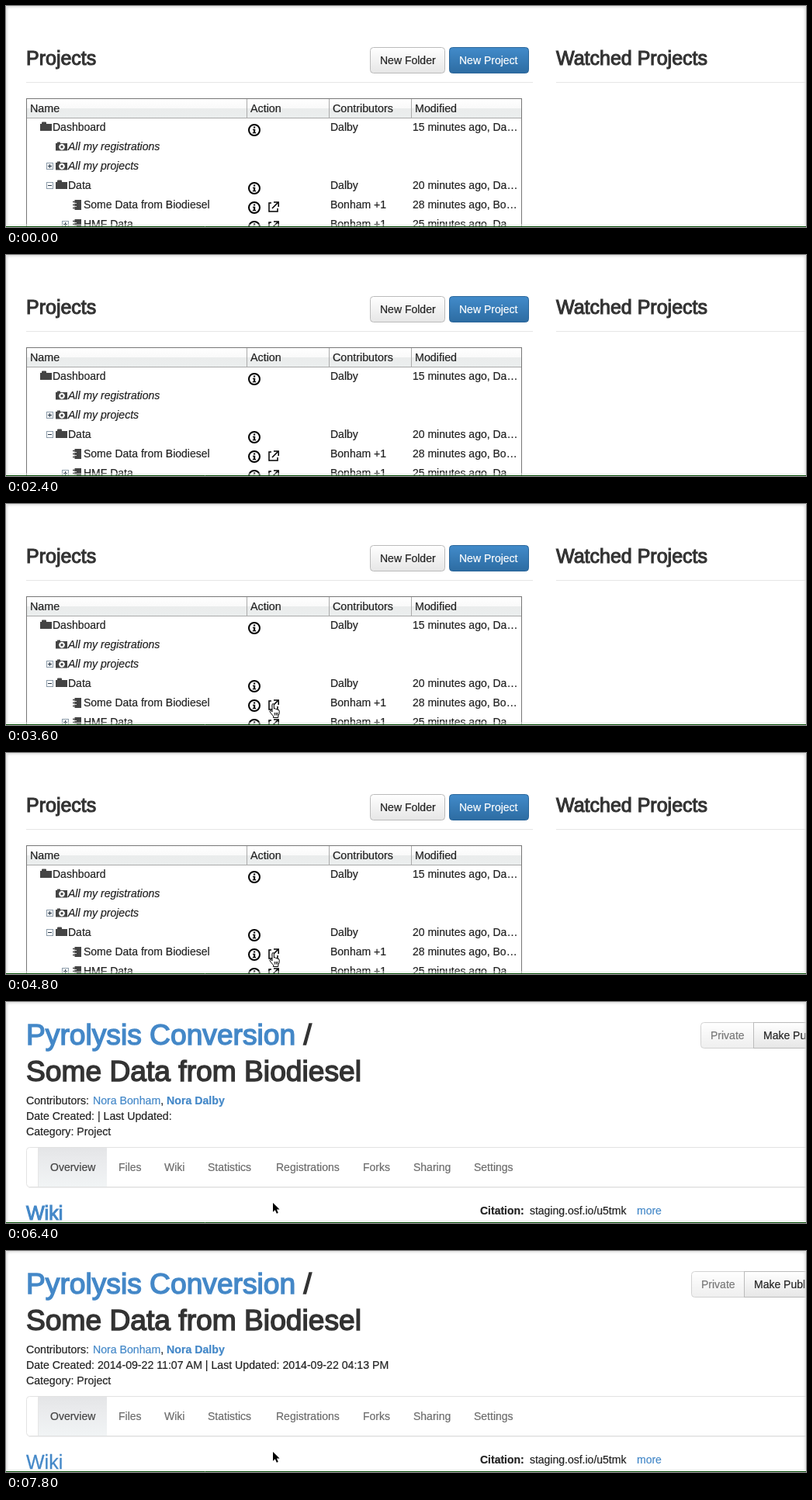
An HTML page that plays this animation: 1031 px wide and 285 px high, repeating every 8000 ms.

```html
<!DOCTYPE html>
<html lang="en">
<head>
<meta charset="utf-8">
<title>Project dashboard</title>
<style>
html, body { margin: 0; width: 100%; height: 100%; overflow: hidden; background: #fff; }
svg { display: block; width: 1031px; height: 285px; font: 14px "Liberation Sans", Arial, sans-serif; color: #222; }
text, tspan { fill: currentColor; stroke: currentColor; }
text { white-space: pre; stroke-width: .2px; }
.head { font-size: 25px; color: #333; stroke-width: 1.1px; }
.title { font-size: 37.2px; color: #333; stroke-width: 1.5px; }
.link { color: #4488c8; }
.thin { stroke-width: .3px; }
.cols { font-size: 14.3px; }
.meta { font-size: 14.15px; }
.nav { color: #6c6c6c; }
.line { stroke: #e6e6e6; }
.grid { stroke: #aaa; }
.italic { font-style: italic; }
.bold { font-weight: bold; }

.list, .detail, .loading, .loaded, .arrow, .hand { animation: 8s step-end infinite; }
.list { animation-name: list; }
.detail { animation-name: detail; }
.loading { animation-name: loading; }
.loaded { animation-name: loaded; }
.shift { animation: shift 8s step-end infinite; }
.arrow { animation-name: arrow; }
.hand { animation-name: hand; }

@keyframes list { 0% { opacity: 1 } 80%, 100% { opacity: 0 } }
@keyframes detail { 0% { opacity: 0 } 80%, 100% { opacity: 1 } }
@keyframes loading { 0% { opacity: 1 } 82.5%, 100% { opacity: 0 } }
@keyframes loaded { 0% { opacity: 0 } 82.5%, 100% { opacity: 1 } }
@keyframes shift { 0% { transform: none } 82.5%, 100% { transform: translateX(-12px) } }
@keyframes arrow {
  0% { opacity: 0; transform: translate(430px, 276px) }
  32.5% { opacity: 1; transform: translate(430px, 276px) }
  35% { opacity: 1; transform: translate(395px, 256px) }
  37.5% { opacity: 1; transform: translate(376px, 247px) }
  40% { opacity: 0; transform: translate(344px, 259px) }
  75%, 100% { opacity: 1; transform: translate(344px, 259px) }
}
@keyframes hand { 0% { opacity: 0 } 40% { opacity: 1 } 75%, 100% { opacity: 0 } }
</style>
</head>
<body>
<svg viewBox="0 0 1031 285">
  <defs>
    <linearGradient id="light" x2="0" y2="1"><stop stop-color="#fff"/><stop offset="1" stop-color="#e6e6e6"/></linearGradient>
    <linearGradient id="blue" x2="0" y2="1"><stop stop-color="#428bca"/><stop offset="1" stop-color="#2d6ca2"/></linearGradient>
    <linearGradient id="header" x2="0" y2="1"><stop stop-color="#fff"/><stop offset=".48" stop-color="#fafafa"/><stop offset=".52" stop-color="#eaecec"/><stop offset="1" stop-color="#ebeeee"/></linearGradient>
    <linearGradient id="tab" x2="0" y2="1"><stop stop-color="#e4e5e7"/><stop offset=".3" stop-color="#e9eaec"/><stop offset="1" stop-color="#f1f4f5"/></linearGradient>
    <filter id="blur"><feGaussianBlur stdDeviation="1.4"/></filter>

    <path id="folder" fill="#444" d="M0 2.5H2V1.2Q2 0 3 0H7Q8 0 8 1.2V2.5H15V11.5H0Z"/>
    <g id="smart">
      <path fill="#444" d="M0 1.5H2V0H6V1.5H15V11H0Z"/>
      <circle cx="8" cy="6.2" r="2.7" fill="none" stroke="#fff" stroke-width="2"/>
      <path stroke="#fff" d="M8 2.2V4M8 8.4V10.2M4 6.2H5.6M10.4 6.2H12"/>
    </g>
    <g id="book">
      <path fill="#444" d="M2.5 0H11V13H2.5Z"/>
      <path stroke="#444" stroke-width="1.5" d="M0 2.5H4M0 6.5H4M0 10.5H4"/>
      <path stroke="#fff" stroke-width=".8" d="M2.5 4.5H5M2.5 8.5H5"/>
    </g>
    <g id="box" fill="#fff">
      <rect x=".5" y=".5" width="8" height="8" stroke="#8a9aa8"/>
      <path stroke="#234" d="M2 4.5H7"/>
    </g>
    <g id="plus"><use href="#box"/><path stroke="#234" d="M4.5 2V7"/></g>
    <g id="info">
      <circle r="7" fill="#fff" stroke="#000" stroke-width="2"/>
      <path fill="#000" d="M-1-4.5H1.2V-2.4H-1ZM-2-1.2H1.2V3H2.2V4.3H-2.2V3H-1V0H-2Z"/>
    </g>
    <g id="open" fill="none" stroke="#000">
      <path stroke-width="1.5" d="M4 2H1V13H12V9"/>
      <path stroke-width="1.6" d="M5 9 12.5 1.5"/>
      <path stroke-width="1.5" d="M7 1H13.2V7"/>
    </g>
  </defs>

  <rect width="1031" height="285" fill="#fff"/>

  <g class="list">
    <text class="head" x="26" y="75.5">Projects</text>
    <text class="head" x="709" y="75.5">Watched Projects</text>
    <path class="line" d="M26 98.5H679M709 98.5H1031"/>
    <rect x="469.5" y="53.5" width="96" height="33" rx="4" fill="url(#light)" stroke="#bbb"/>
    <text x="482" y="75">New Folder</text>
    <rect x="571.5" y="53.5" width="102" height="33" rx="4" fill="url(#blue)" stroke="#2b669a"/>
    <text x="584" y="75" color="#fff">New Project</text>

    <rect x="26.5" y="119.5" width="638" height="180" fill="#fff" stroke="#777"/>
    <rect x="27" y="120" width="637" height="24" fill="url(#header)"/>
    <path class="grid" d="M27 144.5H664M310.5 120V144M416.5 120V144M522.5 120V144"/>
    <g class="cols">
      <text x="31" y="137">Name</text>
      <text x="315" y="137">Action</text>
      <text x="421" y="137">Contributors</text>
      <text x="527" y="137">Modified</text>
    </g>

    <use href="#folder" x="44" y="149.5"/>
    <text x="60" y="161">Dashboard</text>
    <use href="#info" x="320" y="160"/>
    <text x="418" y="161">Dalby</text>
    <text x="524" y="161">15 minutes ago, Da…</text>

    <use href="#smart" x="64" y="175.5"/>
    <text class="italic" x="80" y="186">All my registrations</text>

    <use href="#plus" x="52" y="202"/>
    <use href="#smart" x="64" y="200.5"/>
    <text class="italic" x="80" y="211">All my projects</text>

    <use href="#box" x="52" y="227"/>
    <use href="#folder" x="64" y="224.5"/>
    <text x="80" y="236">Data</text>
    <use href="#info" x="320" y="235"/>
    <text x="418" y="236">Dalby</text>
    <text x="524" y="236">20 minutes ago, Da…</text>

    <use href="#book" x="86" y="250"/>
    <text x="100" y="261">Some Data from Biodiesel</text>
    <use href="#info" x="320" y="260"/>
    <use href="#open" x="338" y="252"/>
    <text x="418" y="261">Bonham +1</text>
    <text x="524" y="261">28 minutes ago, Bo…</text>

    <use href="#plus" x="72" y="277"/>
    <use href="#book" x="86" y="275"/>
    <text x="100" y="286">HMF Data</text>
    <use href="#info" x="320" y="285"/>
    <use href="#open" x="338" y="277"/>
    <text x="418" y="286">Bonham +1</text>
    <text x="524" y="286">25 minutes ago, Da…</text>
  </g>

  <g class="detail">
    <text class="title" x="26" y="55"><tspan class="link">Pyrolysis Conversion</tspan> /</text>
    <text class="title" x="26" y="102">Some Data from Biodiesel</text>
    <g class="shift">
      <path d="M963.5 26.5H899.5Q895.5 26.5 895.5 30.5V55.5Q895.5 59.5 899.5 59.5H963.5Z" fill="url(#light)" stroke="#bbb" opacity=".65"/>
      <text x="908" y="48" color="#777">Private</text>
      <rect x="963.5" y="26.5" width="110" height="33" fill="url(#light)" stroke="#bbb"/>
      <text x="976" y="48">Make Public</text>
    </g>

    <g class="meta">
      <text x="26" y="132">Contributors: <tspan class="link" x="112">Nora Bonham</tspan>, <tspan class="link bold">Nora Dalby</tspan></text>
      <text class="loading" x="26" y="152">Date Created: | Last Updated:</text>
      <text class="loaded" x="26" y="152">Date Created: 2014-09-22 11:07 AM | Last Updated: 2014-09-22 04:13 PM</text>
      <text x="26" y="172">Category: Project</text>
    </g>

    <rect x="26.5" y="187.5" width="1020" height="51" rx="4" fill="#fff" stroke="#e2e2e2"/>
    <path d="M29 239.5H1031" stroke="#eee"/>
    <rect x="42" y="188" width="88" height="50" fill="url(#tab)"/>
    <path d="M41.5 188V238" stroke="#e6e6e6"/>
    <g class="nav">
      <text x="57" y="218" color="#444">Overview</text>
      <text x="145" y="218">Files</text>
      <text x="204" y="218">Wiki</text>
      <text x="260" y="218">Statistics</text>
      <text x="348" y="218">Registrations</text>
      <text x="460" y="218">Forks</text>
      <text x="525" y="218">Sharing</text>
      <text x="603" y="218">Settings</text>
    </g>

    <text class="head link loading" x="26" y="281">Wiki</text>
    <text class="head link thin loaded" x="26" y="281">Wiki</text>
    <text x="611" y="274"><tspan class="bold">Citation:</tspan><tspan x="671"> staging.osf.io/u5tmk</tspan></text>
    <text class="link" x="813" y="274">more</text>
  </g>

  <rect x="-.5" y="-.5" width="1032" height="300" rx="6" fill="none" stroke="#dcdcdc" stroke-width="4" filter="url(#blur)"/>
  <path d="M0 282.5H1031" stroke="#eee" stroke-width="2" opacity=".6"/>

  <g class="arrow">
    <path d="M0 0V11.8L2.8 9.2 4.8 13.8 6.8 12.9 4.9 8.5H8.6Z" fill="#000" stroke="#fff" stroke-width="1.2" paint-order="stroke"/>
  </g>
  <g class="hand">
    <path transform="translate(339 257)" fill="#fff" stroke="#000" stroke-linejoin="round"
      d="M4 11V2Q4 .6 5.2 .6T6.4 2V7Q8.4 6 8.8 7.6 10.6 6.9 11 8.4 13.2 8 13.2 10V13.5L11.8 16V18.5H5.5V16.5L2.4 12.8Q.2 10.3 1.4 9.6T4 11ZM7.2 12V15.5M9.2 12V15.5M11 12V15.5"/>
  </g>

  <path d="M0 284.5H1031" stroke="#0a500a"/>
</svg>
</body>
</html>
```
